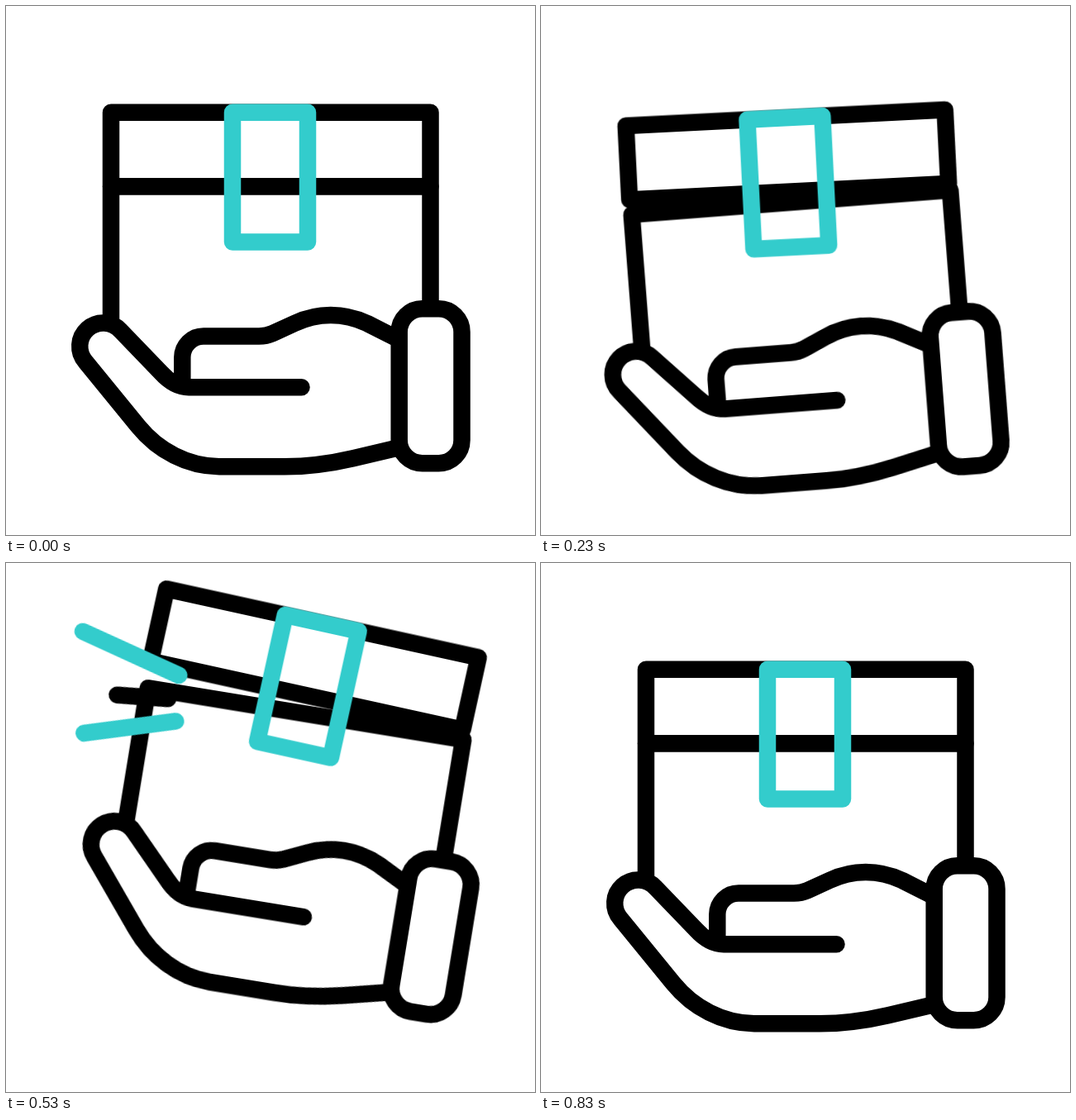
An HTML page for the animation above (1.67 s loop, 640 px wide and 640 px high).

```html
<!DOCTYPE html>
<html lang="en">
<head>
<meta charset="utf-8">
<title>Package in hand</title>
<style>
  html, body { margin: 0; height: 100%; overflow: hidden; background: #fff; }
  svg { display: block; width: 100%; height: 100%; }

  .ink, .teal {
    fill: none;
    stroke: #000;
    stroke-width: 20.5;
    stroke-linejoin: round;
  }
  .teal { stroke: #3cc; }
  .round { stroke-linecap: round; }

  /* 50 ticks per loop, so one tick is 2%; steps() holds each pose for a tick */
  .scene, .lid, .spark {
    animation: 1670ms steps(1) -6ms infinite;
  }
  .scene { animation-name: tilt; transform-origin: 561.5px 460px; }
  .lid   { animation-name: pop; transform-origin: 320.25px 173.5px; }
  .spark { animation-name: burst; }

  @keyframes tilt {
    0%   { transform: rotate(0deg); animation-timing-function: steps(4); }
    8%   { transform: rotate(-4.55deg); }
    10%  { transform: rotate(-5.7deg); }
    12%  { transform: rotate(-6deg); animation-timing-function: steps(7); }
    26%  { transform: rotate(5.12deg); animation-timing-function: steps(3); }
    32%  { transform: rotate(9.3deg); }
    34%  { transform: rotate(10.5deg); }
    36%  { transform: rotate(10.8deg); }
    38%  { transform: rotate(10.02deg); animation-timing-function: steps(3); }
    44%  { transform: rotate(5.23deg); animation-timing-function: steps(3); }
    50%, 100% { transform: rotate(0deg); }
  }

  @keyframes pop {
    0%   { transform: translateY(0) rotate(0deg); }
    12%  { transform: translateY(0) rotate(0deg); animation-timing-function: steps(4); }
    20%  { transform: translateY(-52px) rotate(6.1deg); }
    22%  { transform: translateY(-56px) rotate(7deg); }
    24%  { transform: translateY(-55px) rotate(7.4deg); }
    26%  { transform: translateY(-51.3px) rotate(7.12deg); animation-timing-function: steps(3); }
    32%  { transform: translateY(-22px) rotate(3.1deg); animation-timing-function: steps(2); }
    36%  { transform: translateY(-5px) rotate(1deg); }
    38%  { transform: translateY(-1.3px) rotate(.38deg); }
    40%, 100% { transform: translateY(0) rotate(0deg); }
  }

  @keyframes burst {
    0%   { opacity: 0; stroke-dasharray: 0 300; stroke-dashoffset: 0; }
    18%  { opacity: 1; stroke-dasharray: 6 300; stroke-dashoffset: 0; animation-timing-function: steps(4); }
    26%  { opacity: 1; stroke-dasharray: 69 300; stroke-dashoffset: 0; animation-timing-function: steps(2); }
    30%  { opacity: 1; stroke-dasharray: 76 300; stroke-dashoffset: -21; }
    32%  { opacity: 1; stroke-dasharray: 68.5 300; stroke-dashoffset: -31.5; animation-timing-function: steps(3); }
    38%  { opacity: 1; stroke-dasharray: 37 300; stroke-dashoffset: -63; animation-timing-function: steps(3); }
    44%  { opacity: 1; stroke-dasharray: 2.3 300; stroke-dashoffset: -97.5; }
    46%, 100% { opacity: 0; stroke-dasharray: 0 300; stroke-dashoffset: -100; }
  }
</style>
</head>
<body>
<svg viewBox="0 0 640 640">
  <g class="scene">
    <!-- box -->
    <path class="ink" d="M127 382V218.3H513.5V362"/>

    <!-- hand -->
    <path class="ink round" d="M357.5 461.3H221C207 461.3 196 453 187 443L138.8 393
      A28.3 28.3 0 0 0 96.3 430.4L160 508.5C184 538 220 557.2 258 557.2H337
      C365 557.2 393 553.5 420 547.2L473 534.7"/>
    <path class="ink" d="M213.3 460V425A25.7 25.7 0 0 1 239 399.5H306
      C312 399.5 317 398.7 322.5 396.2L349 384C377 370.7 408.5 370.7 437 384L475.7 403.6"/>
    <rect class="ink" x="475.7" y="366.3" width="75.8" height="187" rx="28"/>

    <!-- lid, tape and sparks -->
    <g class="lid">
      <rect class="ink" x="127" y="128.8" width="386.5" height="89.5"/>
      <rect class="teal" x="274" y="128.8" width="91" height="156.7"/>
      <path class="spark ink round" pathLength="100" d="M185.4 254L96.3 266.8"/>
      <path class="spark teal round" pathLength="100" d="M221.6 240L39.3 200.7"/>
      <path class="spark teal round" pathLength="100" d="M220.7 265.3L67 320.6"/>
    </g>
  </g>
</svg>
</body>
</html>
```
